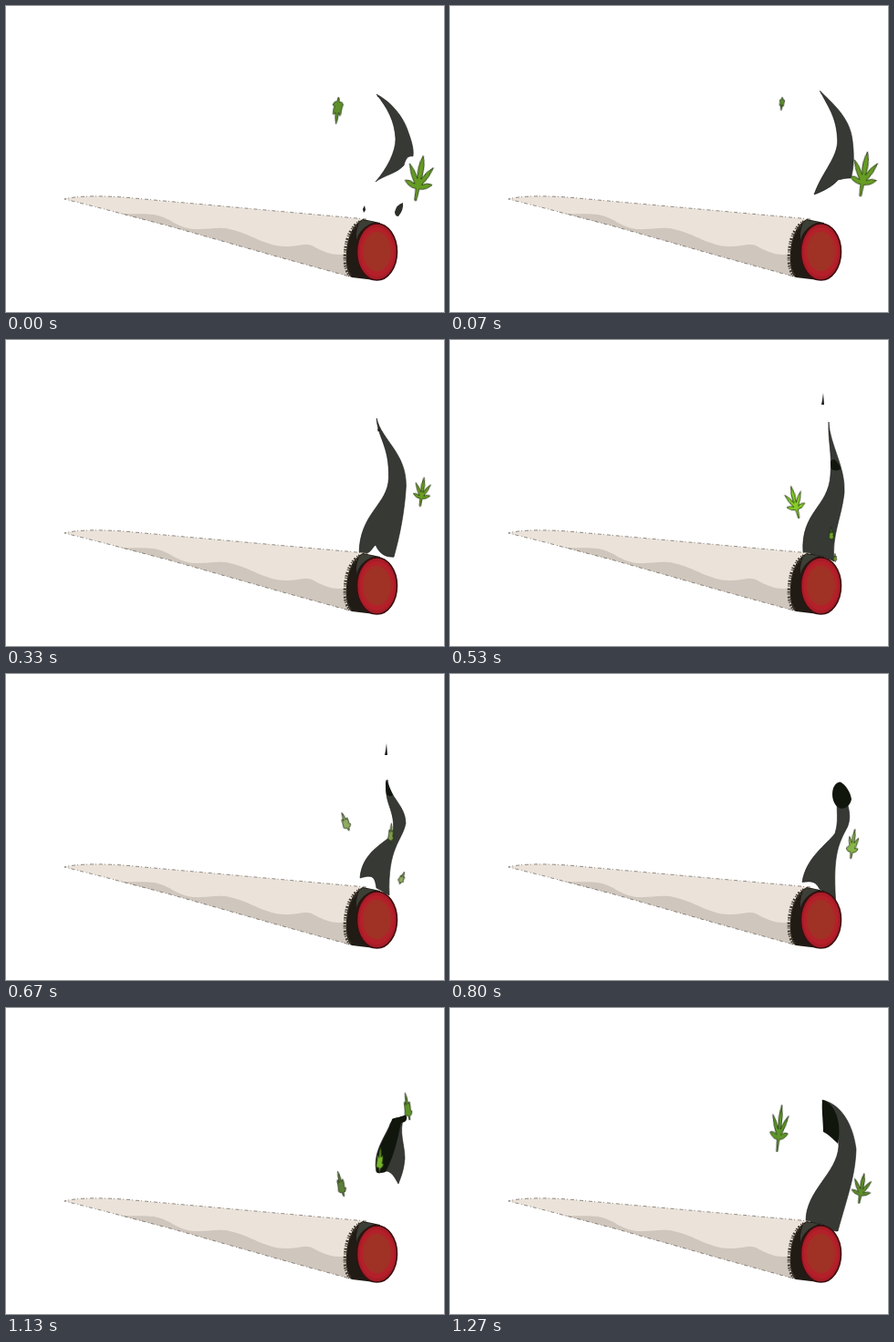
Animation, 480 px wide and 336 px high, one loop 1340 ms. Source, as an HTML page without scripts:

```html
<!DOCTYPE html>
<html lang="en">
<head>
<meta charset="utf-8">
<title>Smoke and leaves</title>
<style>
:root {
  --open: path("M0-25Q5-12 2 1Q7-9 14-14Q11-2 4 7Q10 3 16 5Q10 12 2 12L1 25L-1 25L-2 12Q-10 12-16 5Q-10 3-4 7Q-11-2-14-14Q-7-9-2 1Q-5-12 0-25Z");
  --folded: path("M-2-25Q4-16 4-4Q8-8 11-8Q13 3 10 8Q14 8 16 10Q12 18 4 18L3 25L0 25L-3 17Q-12 18-15 14Q-13 6-12 0Q-14-4-10-9Q-7-6-5-3Q-6-16-2-25Z");
}
html, body { margin: 0; width: 100%; height: 100%; overflow: hidden; background: #fff; }
svg { display: block; width: 100vw; height: 100vh; }
.smoke, .soot, .leaf, .bit { animation: 1340ms infinite; }
.smoke { fill: #363934; stroke: #171915; stroke-width: .6; animation-name: smoke; }
.soot { fill: #11160d; animation-name: soot; }
.leaf {
  d: var(--open);
  fill: #5f9724; stroke: #1b260d; stroke-width: .7;
  vector-effect: non-scaling-stroke;
  transform: translate(0, 0) rotate(0deg) scale(0, 0);
}
.folded { d: var(--folded); }
.bit { fill: #191b17; opacity: 0; animation-timing-function: step-end; }

/* Every segment advances in whole drawings of about 67 ms. */
@keyframes smoke {
  0%, 100% { animation-timing-function: steps(3);
    d: path("M406 97C422 105 436 122 441 139C445 150 447 158 446 165C440 164 438 168 436 175C428 184 414 186 405 193C418 178 427 160 427 146C426 126 418 112 406 97Z"); }
  14.925% { animation-timing-function: steps(5);
    d: path("M404 85C410 108 440 120 440 158C439 185 435 215 426 237C418 238 410 236 405 222C401 226 400 238 387 235C388 190 420 180 420 152C421 115 405 105 404 85Z"); }
  39.552% { animation-timing-function: steps(2);
    d: path("M415 90C416 115 434 140 432 168C429 195 418 215 421 243C415 240 410 238 405 237C400 236 394 236 387 234C384 188 415 184 417 148C419 125 414 110 415 90Z"); }
  50% { animation-timing-function: steps(4);
    d: path("M418 116C420 136 438 144 438 164C434 184 418 190 420 243C414 240 412 238 406 235C404 222 402 220 388 224C390 196 414 186 424 176C428 148 412 142 418 116Z"); }
  69.403% { animation-timing-function: steps(3);
    d: path("M438 134C446 136 446 160 433 172C418 188 421 205 425 252C415 246 410 240 404 237C398 234 392 234 384 233C390 208 410 190 420 174C428 165 428 142 438 134Z"); }
  84.328% { animation-timing-function: steps(2);
    d: path("M436 121C430 135 437 150 437 165C436 178 433 185 430 193C426 186 423 180 417 179C412 180 410 182 406 180C402 160 413 145 420 130C422 122 428 120 436 121Z"); }
  94.776% { animation-timing-function: steps(1);
    d: path("M408 101C430 106 442 130 445 155C444 185 436 205 425 245C418 246 412 238 405 237C400 236 396 236 390 234C390 200 424 182 426 152C427 130 410 120 408 101Z"); }
}
@keyframes soot {
  0%, 100% { animation-timing-function: steps(3);
    d: path("M407 98C407 98 408 99 408 99C408 99 408 100 408 100C408 100 407 99 407 99C407 99 407 98 407 98Z"); }
  14.925% { animation-timing-function: steps(5);
    d: path("M405 88C405 88 405 89 405 89C405 89 405 90 405 90C405 90 405 89 405 89C405 89 405 88 405 88Z"); }
  39.552% { animation-timing-function: steps(2);
    d: path("M421 131C425 134 428 139 428 142C424 144 420 143 418 142C417 139 417 136 417 133C418 132 420 131 421 131Z"); }
  50% { animation-timing-function: steps(4);
    d: path("M417 116C419 122 422 128 424 133C421 135 419 134 417 132C416 128 416 124 416 122C416 119 416 117 417 116Z"); }
  69.403% { animation-timing-function: steps(3);
    d: path("M438 121C448 121 455 130 456 142C456 154 448 163 438 163C428 163 422 153 422 142C422 130 429 121 438 121Z"); }
  84.328% { animation-timing-function: steps(2);
    d: path("M438 117C441 122 438 126 433 126C428 150 424 165 416 180C408 182 405 182 406 176C404 152 420 138 423 122C427 120 433 120 438 117Z"); }
  94.776% { animation-timing-function: steps(1);
    d: path("M408 101C416 102 424 112 426 128C427 138 426 144 425 149C420 144 414 138 409 136C409 124 407 112 408 101Z"); }
}

@keyframes left-late {
  0%, 100% { d: var(--folded); transform: translate(363px, 115px) rotate(188deg) scale(.36, .58); fill: #5d8f2b; animation-timing-function: steps(2); }
  10.448% { transform: translate(364px, 100px) rotate(188deg) scale(0, 0); }
  59.701% { transform: translate(387px, 240px) rotate(0deg) scale(0, 0); animation-timing-function: steps(2); }
  69.403% { transform: translate(387px, 228px) rotate(0deg) scale(.2, .2); fill: #4f7a25; animation-timing-function: steps(3); }
  84.328% { d: var(--folded); transform: translate(367px, 193px) rotate(-12deg) scale(.28, .56); fill: #5c7f38; animation-timing-function: steps(2); }
  94.776% { d: var(--open); transform: translate(361px, 132px) rotate(6deg) scale(.62, 1.03); fill: #5d9528; animation-timing-function: steps(1); }
}
@keyframes right-late {
  0%, 100% { transform: translate(453px, 189px) rotate(10deg) scale(.95, 1); fill: #649c23; animation-timing-function: steps(3); }
  14.925% { transform: translate(455px, 175px) rotate(8deg) scale(.88, .96); fill: #6a9f20; animation-timing-function: steps(3); }
  29.851% { transform: translate(458px, 150px) rotate(8deg) scale(0, 0); }
  89.552% { transform: translate(440px, 215px) rotate(10deg) scale(0, 0); animation-timing-function: steps(1); }
  94.776% { transform: translate(451px, 198px) rotate(10deg) scale(.66, .66); fill: #5f8f2a; animation-timing-function: steps(1); }
}
@keyframes center-early {
  25.373% { transform: translate(415px, 238px) rotate(0deg) scale(0, 0); animation-timing-function: steps(3); }
  39.552% { transform: translate(418px, 213px) rotate(0deg) scale(.18, .3); fill: #6da52c; animation-timing-function: steps(2); }
  50% { transform: translate(422px, 175px) rotate(4deg) scale(.2, .44); fill: #7d9b4b; animation-timing-function: steps(2); }
  59.701% { transform: translate(425px, 140px) rotate(4deg) scale(0, 0); }
}
@keyframes left-early {
  20.149% { transform: translate(395px, 228px) rotate(0deg) scale(0, 0); animation-timing-function: steps(4); }
  39.552% { d: var(--open); transform: translate(378px, 178px) rotate(-14deg) scale(.64, .72); fill: #86cf25; animation-timing-function: steps(2); }
  50% { d: var(--folded); transform: translate(372px, 162px) rotate(-20deg) scale(.28, .42); fill: #90ad62; animation-timing-function: steps(2); }
  59.701% { d: var(--folded); transform: translate(368px, 150px) rotate(-20deg) scale(0, 0); }
}
@keyframes right-early {
  35.075% { transform: translate(421px, 243px) rotate(0deg) scale(0, 0); animation-timing-function: steps(1); }
  39.552% { transform: translate(422px, 239px) rotate(0deg) scale(.12, .18); fill: #6da52c; animation-timing-function: steps(2); }
  50% { d: var(--folded); transform: translate(434px, 224px) rotate(25deg) scale(.2, .28); fill: #90ad62; animation-timing-function: steps(4); }
  69.403% { d: var(--open); transform: translate(449px, 149px) rotate(-6deg) scale(.62, 1.02); fill: #7fbd2d; animation-timing-function: steps(3); }
  84.328% { d: var(--folded); transform: translate(440px, 108px) rotate(-8deg) scale(.26, .6); fill: #5e9228; animation-timing-function: steps(2); }
  94.776% { transform: translate(436px, 80px) rotate(-8deg) scale(0, 0); }
}
@keyframes center-late {
  59.701% { transform: translate(405px, 235px) rotate(0deg) scale(0, 0); animation-timing-function: steps(2); }
  69.403% { d: var(--open); transform: translate(408px, 209px) rotate(0deg) scale(.33, .44); fill: #6fa92c; animation-timing-function: steps(3); }
  84.328% { d: var(--folded); transform: translate(410px, 166px) rotate(4deg) scale(.26, .56); fill: #77b32c; animation-timing-function: steps(2); }
  94.776% { transform: translate(412px, 130px) rotate(4deg) scale(0, 0); }
}

@keyframes crumbs { 0% { opacity: 1; } 5.224%, 100% { opacity: 0; } }
@keyframes shard {
  0% { opacity: 0; }
  10.448% { opacity: 1; transform: translate(-12px, 10px); }
  14.925% { opacity: 1; transform: none; }
  20.149%, 100% { opacity: 0; }
}
@keyframes wisp {
  0% { opacity: 0; }
  35.075%, 39.552% { opacity: 1; transform: none; }
  44.776% { opacity: 1; transform: translate(4px, 9px); }
  50% { opacity: 1; transform: translate(8px, 18px); }
  54.478%, 100% { opacity: 0; }
}
</style>
</head>
<body>
<svg viewBox="0 0 480 336">
  <path class="smoke"/>
  <path class="soot"/>
  <g class="bit" style="animation-name: crumbs">
    <path fill="#2c2f2a" d="M435 216Q428 218 426 226Q426 231 430 231Q436 224 435 216Z"/>
    <path d="M393 219L394 224L392 227L391 223Z"/>
  </g>
  <path class="bit" style="animation-name: shard" d="M466 89Q474 87 480 90L478 110Q476 113 473 111Q466 101 466 89Z"/>
  <path class="bit" style="animation-name: wisp" d="M409 58L410 71L407 71L408 66Z"/>

  <g id="roll">
    <path fill="#ebe3da" d="M64 212C78 208 110 208 140 211L240 220L395 234L380 298L300 276L180 242L100 221Z"/>
    <path fill="#cfc6bd" d="M118 226C135 230 147 227 162 229C180 232 186 243 205 245C220 246 232 242 245 245C268 250 285 264 306 264C320 264 328 260 335 263C348 270 358 275 374 272L380 298L300 276L180 242Z"/>
    <path fill="none" stroke="#4a463f" stroke-width=".6" stroke-dasharray="4 3 1 2" d="M395 234L240 220L140 211C110 208 78 208 64 212L100 221L180 242L300 276L380 298"/>
    <path fill="#211b15" d="M391 234C381 239 374 252 373 270C372 284 374 295 379 298L404 301L410 238Z"/>
    <path fill="none" stroke="#40392f" stroke-width="4" stroke-dasharray="1.5 1 1 2 2 1.3" d="M388 237C378 243 373 255 372 270C371 281 372 290 377 296"/>
    <path fill="#3c3f36" d="M390 235L404 237Q388 243 384 257Q383 242 390 235Z"/>
    <ellipse cx="406.5" cy="270" rx="22" ry="31" fill="#a91c27" stroke="#3a0f10" stroke-width="1.6"/>
    <ellipse cx="406.5" cy="270" rx="19" ry="27" fill="#b4202a"/>
    <ellipse cx="406.5" cy="269.5" rx="15.500" ry="22" fill="#a03125"/>
  </g>

  <path class="leaf" style="animation-name: left-early"/>
  <path class="leaf folded" style="animation-name: center-early"/>
  <path class="leaf folded" style="animation-name: right-early"/>
  <path class="leaf" style="animation-name: center-late"/>
  <path class="leaf folded" style="animation-name: left-late"/>
  <path class="leaf" style="animation-name: right-late"/>
</svg>
</body>
</html>
```
